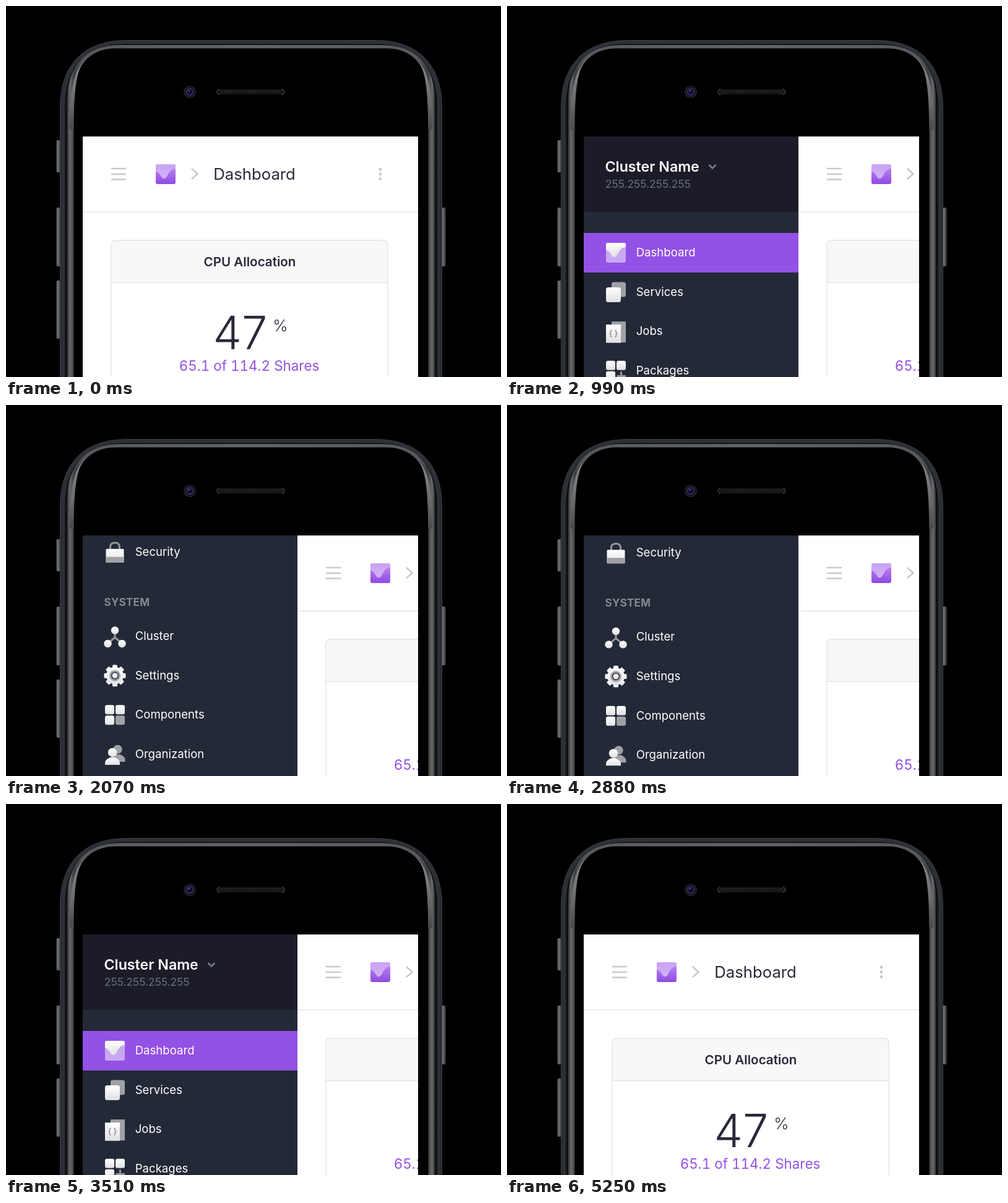
Write an HTML page that moves like this. It is 800x600 px and loops after 5.34 s.

```html
<!DOCTYPE html>
<html lang="en">
<head>
<meta charset="utf-8">
<title>Dashboard menu</title>
<style>
html, body { margin: 0; width: 100%; height: 100%; overflow: hidden; background: #000; }
svg { display: block; width: 100vw; height: 100vh; font-family: Inter, Roboto, sans-serif; }
.mid { text-anchor: middle; }
.label { font-size: 18.6px; fill: #fff; }
.head { font-size: 17px; font-weight: 700; letter-spacing: .3px; fill: #858891; }
.dark { fill: #282a3a; }
.line { fill: none; stroke: #c7c9ce; stroke-width: 2.6; }
.w { fill: url(#white); }
.g { fill: #9fa1a7; }
.gl { fill: none; stroke: #94969d; stroke-width: 3; }
</style>
</head>
<body>
<svg viewBox="0 0 800 600">
  <defs>
    <clipPath id="screen"><rect x="124" y="211" width="542" height="389"/></clipPath>
    <linearGradient id="white" x2="0" y2="1"><stop stop-color="#fff"/><stop offset="1" stop-color="#e0e0e4"/></linearGradient>
    <linearGradient id="violet" x2="0" y2="1"><stop stop-color="#c48ef3"/><stop offset="1" stop-color="#8d4be2"/></linearGradient>
    <linearGradient id="lilac" x2="0" y2="1"><stop stop-color="#c9a2f3"/><stop offset="1" stop-color="#d3b2f7"/></linearGradient>
    <linearGradient id="button"><stop stop-color="#24262a"/><stop offset=".35" stop-color="#77797d"/><stop offset="1" stop-color="#202226"/></linearGradient>
    <linearGradient id="rail" gradientUnits="userSpaceOnUse" x1="98" x2="396" spreadMethod="reflect">
      <stop stop-color="#242527"/><stop offset=".018" stop-color="#696a6b"/><stop offset=".04" stop-color="#3c3d3f"/>
      <stop offset=".09" stop-color="#58595c"/><stop offset="1" stop-color="#626366"/>
    </linearGradient>
    <linearGradient id="shine" x2="0" y2="1"><stop stop-color="#8a8b8c"/><stop offset=".6" stop-color="#6a6b6d"/><stop offset="1" stop-color="#48494b"/></linearGradient>
    <pattern id="mesh" width="3" height="3" patternUnits="userSpaceOnUse"><circle cx="1.5" cy="1.5" r=".9" fill="#3c3c3e"/></pattern>
  </defs>
  <g id="phone"></g>
  <circle cx="297" cy="139" r="9" fill="#0c0c0f" stroke="#29292e" stroke-width="1.6"/>
  <circle cx="297" cy="139" r="5.5" fill="#120f2c" stroke="#352e69" stroke-width="1.8"/>
  <circle cx="295.5" cy="137" r="1.2" fill="#6a6594"/>
  <rect x="340.5" y="134.5" width="110" height="8.5" rx="4.2" fill="#0b0b0c"/>
  <rect x="344" y="135" width="103" height="7.5" fill="url(#mesh)"/>
  <path d="M345 134Q337 138.7 345 143.4M446 134Q454 138.7 446 143.4" fill="none" stroke="#464649" stroke-width="1.4"/>
  <g clip-path="url(#screen)">
    <rect x="124" y="211" width="542" height="389" fill="#fff"/>
    <g id="strip">
      <rect x="-223" y="211" width="347" height="389" fill="#232936"/>
      <g id="menu"></g>
      <rect x="124" y="211" width="542" height="389" fill="#fff"/>
      <path class="line" d="M170 263H194M170 272H194M170 280.5H194"/>
      <g id="badge" transform="translate(242 256)"></g>
      <path class="line" d="M300 263L309.5 271.5L300 280"/>
      <text class="dark" x="335.3" y="280.5" font-size="25.7">Dashboard</text>
      <g fill="#c5c7cb"><circle cx="605" cy="264" r="2.4"/><circle cx="605" cy="271.8" r="2.4"/><circle cx="605" cy="279.6" r="2.4"/></g>
      <path d="M124 333H666" stroke="#e6e6e8" stroke-width="1.5"/>
      <path d="M170 447V386.5Q170 379 177.5 379H609.5Q617 379 617 386.5V447Z" fill="#f8f8f8"/>
      <path d="M170 447.3H617M170 610V386.5Q170 379 177.5 379H609.5Q617 379 617 386.5V610" fill="none" stroke="#e4e4e6" stroke-width="1.3"/>
      <g class="mid">
        <text class="dark" x="394" y="420.5" font-size="20.6" font-weight="600">CPU Allocation</text>
        <text class="dark" x="378.5" y="555" font-size="74" font-weight="300">47</text>
        <text class="dark" x="443.5" y="526" font-size="26" font-weight="300">%</text>
        <text x="393" y="589.5" font-size="22.4" fill="#9351e5" style="font-variant-numeric: tabular-nums">65.1 of 114.2 Shares</text>
      </g>
    </g>
  </g>
</svg>
<script>
const $ = id => document.getElementById(id);
const box = (x, y, w, h, r, c) => `<rect x="${x}" y="${y}" width="${w}" height="${h}" rx="${r}" class="${c}"/>`;
const dot = (x, y, r, c = 'w') => `<circle cx="${x}" cy="${y}" r="${r}" class="${c}"/>`;
const path = (d, c) => `<path d="${d}" class="${c}"/>`;

// Phone outline, inset by dx at the sides and dy at the top; tight shortens the corner
function outline(dx, dy, tight, style) {
  const l = 87 + dx, r = 705 - dx, t = 55 + dy, x = 195 - tight, y = 165 - tight;
  const cx = .36 * (x - l), cy = t + .36 * (y - t);
  return `<path d="M${l} 620V${y}C${l} ${cy} ${l + cx} ${t} ${x} ${t}H${792 - x}C${r - cx} ${t} ${r} ${cy} ${r} ${y}V620Z" ${style}/>`;
}
const button = (x, y, h) => `<rect x="${x}" y="${y}" width="8" height="${h}" rx="2.5" fill="url(#button)"/>`;
const shine = '<path d="M130 86C116 98 110 122 109.5 200H103C103 130 110 103 130 86Z" fill="url(#shine)"/>';
$('phone').innerHTML =
  button(81, 217, 52) + button(81, 326, 95) + button(81, 444, 94) + button(703, 326, 95) +
  outline(.7, .7, 0, 'fill="#1c1e22" stroke="#3f4146" stroke-width="1.4"') +
  outline(5, 3.5, 2, 'fill="none" stroke="#2d3037" stroke-width="5"') +
  outline(9.5, 7, 6, 'fill="#08080a"') +
  outline(11.5, 8, 10, 'fill="url(#rail)"') +
  outline(22.5, 13.5, 17, 'fill="#000"') +
  shine + `<g transform="translate(792 0) scale(-1 1)">${shine}</g>`;

const wave = 'M0 3Q0 0 3 0H29Q32 0 32 3V7C25 7 22 12 19 18C16 24 12 25 9 20C6 15 4 12 0 12Z';
const chart = (base, top) => `<rect width="32" height="32" rx="3" fill="${base}"/><path d="${wave}" fill="${top}"/>`;
$('badge').innerHTML = chart('url(#violet)', 'url(#lilac)');

const person = (x, y, c) => dot(x, y, 7.2, c) +
  path(`M${x - 12} ${y + 20}V${y + 16}Q${x - 11} ${y + 11} ${x - 4} ${y + 8}H${x + 4}Q${x + 11} ${y + 11} ${x + 12} ${y + 16}V${y + 20}Z`, c);
const server = y => box(0, y, 32, 14, 1.5, 'w') + dot(9, y + 5, 1.2, 'g') + dot(13, y + 5, 1.2, 'g') +
  box(3.5, y + 2, 1, 10, 0, 'g') + box(27.5, y + 2, 1, 10, 0, 'g');
const tooth = a => `<rect x="12" y="-1.5" width="8" height="9" rx="1.5" fill="#f3f3f5" transform="rotate(${a} 16 16)"/>`;

const icons = {
  Dashboard: chart('#c9a8f2', 'url(#white)'),
  Services: box(9, 0, 23, 24, 3.5, 'g') + box(0, 8.5, 24, 24, 3.5, 'w'),
  Jobs: box(9, 0, 23, 34, 0, 'g') + box(0, 5, 24, 29.5, 0, 'w') +
    '<text class="mid" x="12" y="23.5" font-size="13" font-weight="600" fill="#8b8d94">{ }</text>',
  Packages: box(0, 0, 15, 15, 3, 'w') + box(17, 0, 15, 15, 3, 'w') + box(0, 17, 15, 15, 3, 'w') +
    path('M24.5 17.5V32M17.5 24.7H32', 'gl'),
  Nodes: box(14.5, -1, 3, 35, 0, 'g') + server(1.5) + server(17.5),
  Networking: path('M16 10V25M4.5 26V17.5H27.5V26', 'gl') + dot(16, 5, 6.2) +
    [4.5, 16, 27.5].map(x => dot(x, 27.5, 4.7)).join(''),
  Security: path('M8.5 13V8Q8.5 1 16 1Q23.5 1 23.5 8V13', 'gl') + box(1.5, 11, 29, 22, 1.5, 'w') + box(1.5, 24, 29, 9, 1, 'g'),
  Cluster: path('M16 7V18L5 27M16 18L27 27', 'gl') + dot(16, 6.5, 6.2) + dot(4.5, 28, 6.2) + dot(27.5, 28, 6.2),
  Settings: [0, 45, 90, 135, 180, 225, 270, 315].map(tooth).join('') + dot(16, 16, 14) +
    '<circle cx="16" cy="16" r="7.5" fill="#232936" stroke="#9fa1a7" stroke-width="3"/>' + dot(16, 16, 4.5),
  Components: box(0, 0, 15, 15, 3, 'w') + box(17, 0, 15, 15, 3, 'w') + box(0, 17, 15, 15, 3, 'w') + box(17, 17, 15, 15, 3, 'g'),
  Organization: person(20.5, 8, 'g') + person(12, 13, 'w')
};
const groups = [
  [398.4, '', ['Dashboard', 'Services', 'Jobs', 'Packages']],
  [725, 'RESOURCES', ['Nodes', 'Networking', 'Security']],
  [988.5, 'SYSTEM', ['Cluster', 'Settings', 'Components', 'Organization']]
];
// Menu coordinates are those of the open state
let menu = `<rect x="124" y="211" width="347" height="121.5" fill="#1b1c27"/>
  <rect x="124" y="367" width="347" height="64" fill="#9351e5"/>
  <text x="158.5" y="267.5" font-size="23.2" font-weight="600" fill="#fff">Cluster Name</text>
  <path d="M326.5 257L332 262.5L337.5 257" fill="none" stroke="#7b7e89" stroke-width="2.6"/>
  <text x="159" y="293.5" font-size="17.3" fill="#6d707b">255.255.255.255</text>`;
for (const [top, title, names] of groups) {
  menu += `<text class="head" x="158.5" y="${top - 48.5}">${title}</text>`;
  names.forEach((name, i) => {
    const y = top + i * 63.65;
    menu += `<g transform="translate(160 ${y - 15.5})">${icons[name]}</g><text class="label" x="208.7" y="${y + 6.5}">${name}</text>`;
  });
}
$('menu').innerHTML = menu;

const LOOP = 5340, WIDTH = 347, SCROLL = 615;
function ease(t, start, span) {
  const x = Math.min(1, Math.max(0, (t - start) / span));
  return x < .5 ? 2 * x * x : 1 - 2 * (1 - x) ** 2;
}
function draw() {
  const t = performance.now() % LOOP;
  const open = ease(t, 10, 500) - ease(t, 3747, 507);
  const scroll = ease(t, 1211, 850) - ease(t, 2862, 564);
  $('strip').setAttribute('transform', `translate(${WIDTH * open} 0)`);
  $('menu').setAttribute('transform', `translate(${-WIDTH} ${-SCROLL * scroll})`);
  requestAnimationFrame(draw);
}
draw();
</script>
</body>
</html>
```
